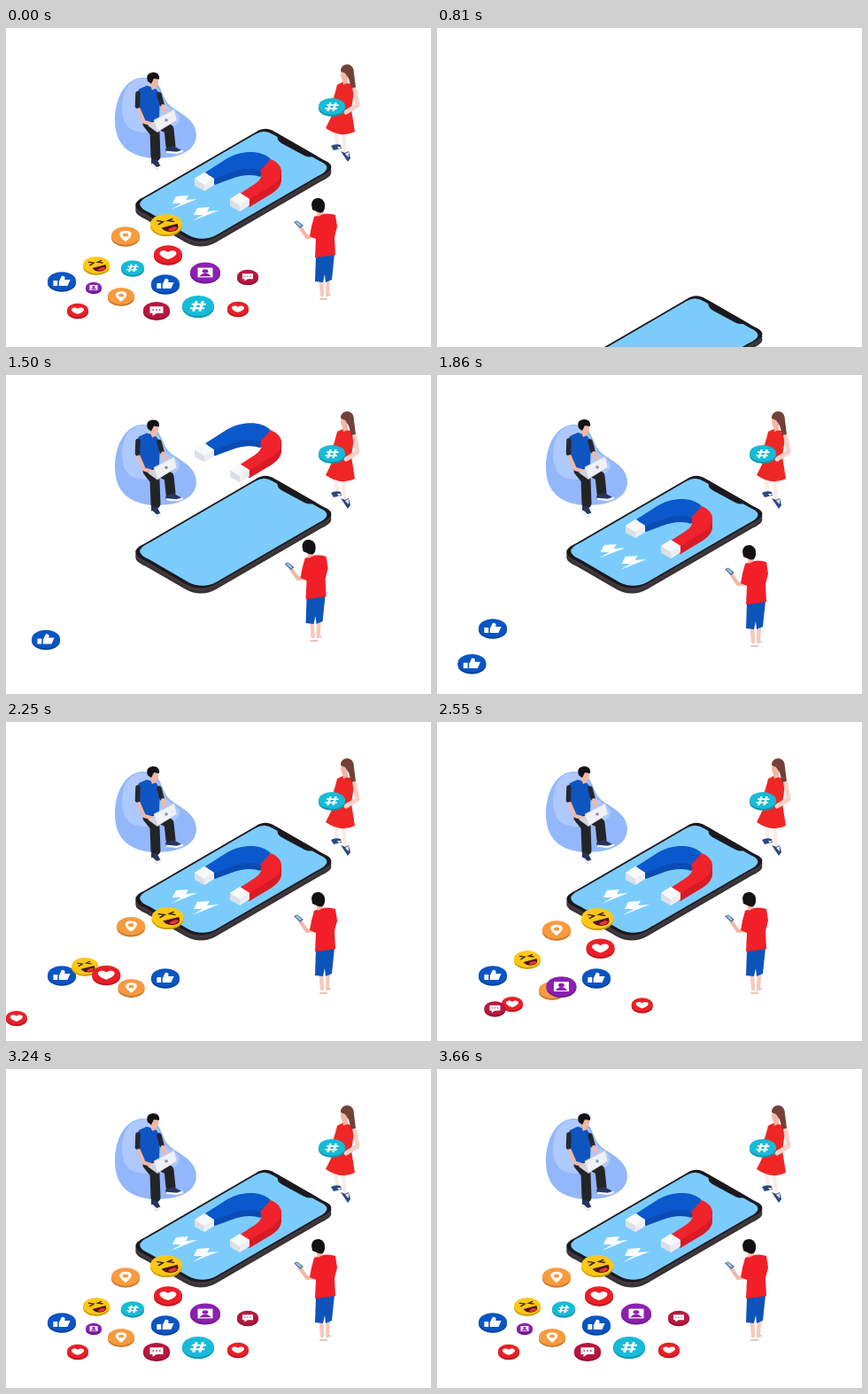
Recreate the animation shown at these times as an HTML page. Size 480 px wide and 360 px high, loop 3.69 s.

```html
<!DOCTYPE html>
<html lang="en">
<head>
<meta charset="utf-8">
<style>
  html, body { margin: 0; width: 100%; height: 100%; overflow: hidden; background: #fff; }
  svg { display: block; width: 480px; height: 360px; }
  .line { fill: none; stroke-linecap: round; stroke-linejoin: round; }
  .skin { stroke: #f3b7a4; stroke-width: 4; }
  .pale { stroke: #fceae4; stroke-width: 4; }
</style>
</head>
<body>
<svg viewBox="0 0 480 360">
  <defs>
    <path id="slab" d="M157 190L282 117.500Q293 110 304 117.500L358 148.500Q378 157 356 167L237 236Q220 245 203 236L158 210Q135 200 157 190Z"/>
    <path id="bluearm" d="M225 163L250 147C266 138 288 137 299 148L287 161C280 158 267 158 255 163L236 170Z"/>
    <path id="redarm" d="M299 148C314 154 316 168 300 178L275 193 264 187 281 176C290 170 290 164 287 161Z"/>
    <g id="tip">
      <path d="M-11-1L0-8 11-1V6L0 13-11 7Z" fill="#dcdfe6"/>
      <path d="M0 6L11-1V6L0 13Z" fill="#eceef3"/>
      <path d="M-11-1L0-8 11-1 0 6Z" fill="#f8f9fb"/>
    </g>
    <path id="bolt" d="M192 190L206 189 203 194 216 193 186 205 198 198 188 198Z"/>
  </defs>
  <g id="stage">
    <!-- data-move: start time, then the offset it travels from -->
    <g data-move="789 0 248">
      <use href="#slab" y="6" fill="#383136"/>
      <use href="#slab" y="3" fill="#40393e"/>
      <use href="#slab" fill="#1b191e"/>
      <use href="#slab" fill="#7bccfc" transform="translate(256.500 178) scale(.955) translate(-256.500 -178)"/>
      <path d="M304 117.500L307 121Q305 126 311 130L337 144Q344 147 348 144L352 145Z" fill="#1b191e"/>
    </g>
    <g data-move="1780 -12 7" fill="#fff">
      <use href="#bolt"/>
      <use href="#bolt" x="24" y="13"/>
    </g>
    <g data-move="1438 0 -210">
      <g fill="#0a4cb4"><use href="#bluearm" y="7"/><use href="#bluearm" y="4"/></g>
      <g fill="#d81b25"><use href="#redarm" y="9"/><use href="#redarm" y="4"/></g>
      <use href="#bluearm" fill="#0b58cc"/>
      <use href="#redarm" fill="#f0222c"/>
      <use href="#tip" x="224" y="171"/>
      <use href="#tip" x="264" y="194"/>
    </g>
    <g data-move="1098 0 308">
      <g transform="translate(0 4)">
        <path d="M155 52C172 53 173 62 180 77C186 90 216 95 215 118C213 140 185 143 168 143C140 142 123 128 123 100C123 75 135 52 155 52Z" fill="#93b7fb"/>
        <path d="M155 53C170 54 174 70 181 83C187 88 197 92 196 99C194 110 175 114 160 114C142 114 131 108 131 85C132 65 140 53 155 53Z" fill="#adc9ff"/>
      </g>
    </g>
    <g data-move="1116 0 -200">
      <path class="line" d="M160 108L168 118 169 145M166 106L184 114 186 133" stroke="#242427" stroke-width="11"/>
      <path d="M164 147L171 149 175 157 170 160 164 154ZM180 136L189 133 200 139 194 142 181 141Z" fill="#26355e"/>
      <path class="line" d="M165 154L170 158.500 174 157M182 140L193 141 199 139" stroke="#f2f4f8" stroke-width="2.500"/>
      <path d="M150 69L159 65 169 68 174 75 173 102 157 109 151 98 146 80Z" fill="#0f55c2"/>
      <path class="line" d="M149 74L148.500 88M173 75L176 86" stroke="#26282d" stroke-width="5.500"/>
      <path class="line skin" d="M150 92L156 106 167 109M177 88L180 94"/>
      <path d="M162 62H170V68L165 70Z" fill="#f3b7a4"/>
      <ellipse cx="167.500" cy="60" rx="4.800" ry="6" fill="#f3b7a4"/>
      <path d="M160 60Q157 51 166 50Q174 50 173 58L167 57 164 63Z" fill="#131316"/>
      <path d="M160 110L173 102 185 108 171 118Z" fill="#cfd4dc"/>
      <path d="M167 104L190 92 193 104 171 117Z" fill="#f0f1f4" stroke="#c9ced8" stroke-width=".7"/>
      <circle cx="181" cy="104" r="1.800" fill="#8c929c"/>
    </g>
    <g data-move="900 85 -49">
      <path class="line pale" d="M372 117L374 132M381 118L383 142"/>
      <path d="M367 133Q372 130 378 132L379 136 370 138ZM378 139L383 141 387 139 389 147 386 151Z" fill="#274a86"/>
      <path d="M374 134L379 134 376 137ZM383 142L387 140 387 146Z" fill="#fceae4"/>
      <path class="line skin" d="M376 68L370 81 357 84"/>
      <path d="M374 64L380 61 389 63 393 72 390 92 394 117Q378 125 361 113L371 93 370 80Z" fill="#ee2724"/>
      <path class="line" d="M377 82L373 93 388 94" stroke="#3c4650" stroke-width="2.500"/>
      <path class="line" d="M394 70L397 87 384 95" stroke="#f6d0c6" stroke-width="5"/>
      <path d="M379 55H386V62L381 64Z" fill="#f3b7a4"/>
      <ellipse cx="382" cy="53" rx="4" ry="6" fill="#f3b7a4"/>
      <path d="M378 49Q378 41 386 41Q393 42 393 51L395 67 390 68 387 57 383 51Z" fill="#73403a"/>
    </g>
    <g id="tray" data-move="1056 0 -100"></g>
    <g data-move="1262 105 61">
      <path class="line" d="M356 285L357 301M364 281L363 299" stroke="#f6cabd" stroke-width="4.500"/>
      <path class="line" d="M355 306L362 306M362 302L366 301" stroke="#e6c4bd" stroke-width="2"/>
      <path d="M350 257L371 255 368 284 361 287 360 278 358 287 349 286Z" fill="#0d54b8"/>
      <path class="line skin" d="M333 226L340 236 348 235"/>
      <path d="M325 219L329 217.500 336 223 332 226Z" fill="#4d6f9c"/>
      <path d="M327 219.500L329 218.500 334 223 332 224Z" fill="#a9cbee"/>
      <path d="M348 213Q362 207 372 211L374 224 371 236 372 256 349 259 350 238 343 235 345 224Z" fill="#f21f28"/>
      <path d="M350 204H358V210L352 213Z" fill="#f3b7a4"/>
      <path d="M345 199Q346 191 354 192Q361 194 360 203Q359 210 353 208L346 205Z" fill="#121215"/>
    </g>
    <g id="chips"></g>
  </g>
</svg>
<script>
const LOOP = 3690, FADE = 270, TRAVEL = 400;
const SOURCE = { x: -15, y: 340 }; // every chip is thrown from here
const CHIP_GAP = 45;
const color = {
  blue: '#0a55c4', red: '#eb1f27', orange: '#fa9a3e', yellow: '#ffc814',
  purple: '#8c20b0', cyan: '#17bbd8', crimson: '#b8163f'
};
// Icons are drawn in a disc of radius 10; "currentColor" is the disc colour.
const icons = {
  heart: '<path d="M0 5C-11-1-4-8 0-3C4-8 11-1 0 5Z"/>',
  thumb: '<path d="M-6-1H-3V5H-6ZM-2 0L0-6Q3-6 2-2H6L4 5H-2Z"/>',
  pin: '<path d="M0 6C-7-2-4-6 0-6S7-2 0 6Z"/><circle cy="-1.5" r="2" fill="currentColor"/>',
  hash: '<path d="M-1-5L-3 5M3-5L1 5M-4-2H5M-5 2H4" fill="none" stroke="#fff" stroke-width="1.7"/>',
  chat: '<path d="M-5-5H5V3H0L-3 6V3H-5Z"/><path d="M-3-1H-2M-.5-1H.5M2-1H3" stroke="currentColor" stroke-width="1.5"/>',
  photo: '<path d="M-5-5H5V5H-5Z"/><path d="M-4 4Q0-3 4 4Z" fill="currentColor"/><circle cy="-1.5" r="2" fill="currentColor"/>',
  laugh: '<path d="M-6-4L-2-3-5 0M4-6L1-4 5-3" fill="none" stroke="#3d2410" stroke-width="1.2"/>' +
    '<path d="M-3 3L7-1Q9 6 3 7Q-1 7-3 3Z" fill="#4a1512"/><path d="M1 5Q5 0 7 3Q5 7 2 6Z" fill="#f0303c"/>'
};

const disc = (icon, tint, x, y, r) => {
  const ry = r * 0.64;
  return `<g transform="translate(${x} ${y})" color="${color[tint]}" fill="currentColor">
    <ellipse cy="1.5" rx="${r}" ry="${ry}"/><ellipse cy="1.5" rx="${r}" ry="${ry}" fill="#000" opacity=".2"/>
    <ellipse cy="-.5" rx="${r}" ry="${ry}"/>
    <g transform="scale(${r / 10} ${ry / 10})" fill="#fff">${icons[icon]}</g>
  </g>`;
};

const chip = (start, icon, tint, x, y, r) =>
  `<g data-move="${start} ${SOURCE.x - x} ${SOURCE.y - y}">${disc(icon, tint, x, y, r)}</g>`;

// Chips of one wave follow each other at a fixed gap
const wave = (start, ...chips) =>
  chips.map((args, i) => chip(start + i * CHIP_GAP, ...args)).join('');

const $ = id => document.getElementById(id);
$('tray').innerHTML = disc('hash', 'cyan', 368, 89, 15);
$('chips').innerHTML =
  wave(1410, ['thumb', 'blue', 63, 286, 16]) +
  wave(1835,
    ['thumb', 'blue', 180, 289, 16], ['laugh', 'yellow', 181, 222, 18],
    ['pin', 'orange', 135, 235, 16], ['pin', 'orange', 130, 303, 15]) +
  wave(2135,
    ['laugh', 'yellow', 102, 268, 15], ['heart', 'red', 183, 256, 16], ['heart', 'red', 81, 319, 12]) +
  wave(2435,
    ['heart', 'red', 262, 317, 12], ['photo', 'purple', 225, 276, 17],
    ['chat', 'crimson', 273, 281, 12], ['chat', 'crimson', 170, 319, 15]) +
  wave(2755,
    ['photo', 'purple', 99, 293, 9], ['hash', 'cyan', 217, 314, 18], ['hash', 'cyan', 143, 271, 13]);

const parts = [...document.querySelectorAll('[data-move]')].map(node => {
  const [start, dx, dy] = node.dataset.move.split(' ').map(Number);
  return { node, start, dx, dy };
});

// Remaining distance, running slightly past the resting place before settling
function remaining(u) {
  const v = Math.min(u, 1) - 1;
  return -2.7 * v ** 3 - 1.7 * v ** 2;
}

function draw(t) {
  const leaving = t < FADE;
  const time = leaving ? LOOP : t;
  $('stage').setAttribute('opacity', leaving ? 1 - t / FADE : 1);
  for (const { node, start, dx, dy } of parts) {
    const left = remaining(Math.max(0, time - start) / TRAVEL);
    node.setAttribute('visibility', time < start ? 'hidden' : 'visible');
    node.setAttribute('transform', `translate(${dx * left} ${dy * left})`);
  }
}

const began = performance.now();
function tick() {
  draw((performance.now() - began) % LOOP);
  requestAnimationFrame(tick);
}
tick();
</script>
</body>
</html>
```
